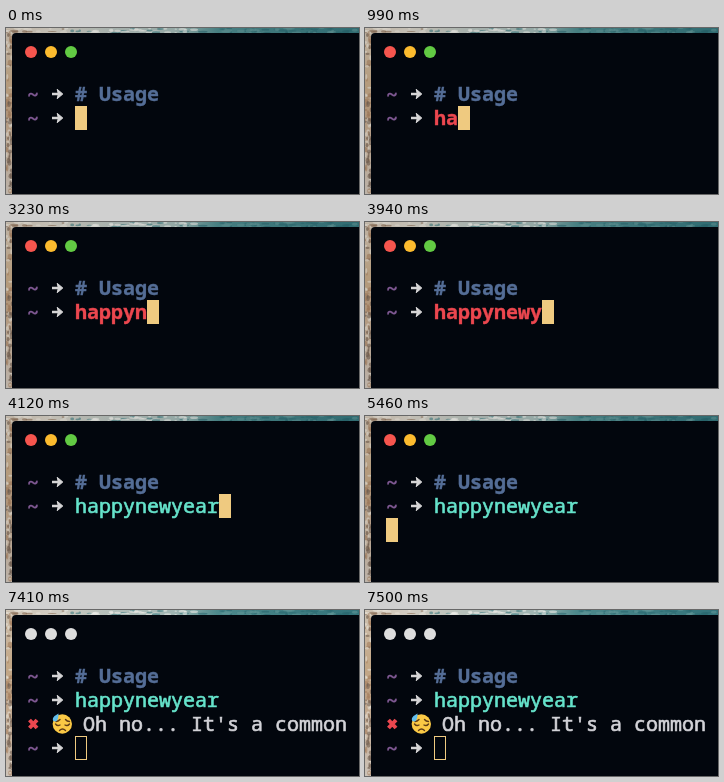
Write an HTML page that moves like this. It is 353x166 px and loops after 8.03 s.

```html
<!DOCTYPE html>
<html lang="en">
<head>
<meta charset="utf-8">
<title>Terminal usage</title>
<style>
  html, body { margin: 0; width: 100%; height: 100%; overflow: hidden; background: #02060d; }
  svg { display: block; width: 353px; height: 166px; }
  text { font: 20px "Noto Sans Mono", "DejaVu Sans Mono", monospace; }
  .bold { font-weight: 700; stroke-width: .35; }
  .medium { stroke-width: .65; }
</style>
</head>
<body>
<svg viewBox="0 0 353 166">
  <defs>
    <linearGradient id="sea">
      <stop offset="0" stop-color="#d3c6b5"/>
      <stop offset=".12" stop-color="#d9d3c8"/>
      <stop offset=".3" stop-color="#b9c4bf"/>
      <stop offset=".48" stop-color="#a5bbb8"/>
      <stop offset=".6" stop-color="#4f8d90"/>
      <stop offset="1" stop-color="#35777e"/>
    </linearGradient>
    <linearGradient id="sand" x2="0" y2="1">
      <stop offset="0" stop-color="#d3c6b5"/>
      <stop offset=".3" stop-color="#c9ad8b"/>
      <stop offset=".5" stop-color="#c4a688"/>
      <stop offset="1" stop-color="#d2c8bd"/>
    </linearGradient>
    <g id="prompt">
      <text class="bold" x="21" y="20" fill="#805a94" stroke="#805a94">~</text>
      <path d="M46 12H53" stroke="#d6d5d6" stroke-width="2.5"/>
      <path d="M51.2 7.3L56.8 12L51.2 16.7L52.3 12Z" fill="#d6d5d6" stroke="#d6d5d6" stroke-linejoin="round"/>
    </g>
  </defs>

  <rect width="353" height="166" fill="url(#sea)"/>
  <rect y="5" width="8" height="161" fill="url(#sand)"/>
  <g id="texture"></g>
  <rect id="shade" width="353" height="166"/>
  <path d="M6 166V9Q6 5 10 5H353V166Z" fill="#02060d"/>

  <g id="buttons">
    <circle cx="25" cy="24" r="6"/>
    <circle cx="45" cy="24" r="6"/>
    <circle cx="65" cy="24" r="6"/>
  </g>

  <use href="#prompt" y="54"/>
  <text class="bold" x="69" y="73" fill="#546d96" stroke="#546d96"># Usage</text>
  <use href="#prompt" y="78"/>
  <text id="command" x="69" y="97"></text>

  <g id="output">
    <path d="M23.5 110L31 118M31 110L23.5 118" stroke="#ec474f" stroke-width="4"/>
    <circle cx="56.3" cy="114" r="9.7" fill="#fbc945"/>
    <g fill="none" stroke="#5e3b17" stroke-width="1.4" stroke-linecap="round">
      <path d="M50 111.5Q52 111.5 54 109.5M59.5 109.5Q61 111.5 63.5 111.5"/>
      <path d="M49.5 114Q51.5 116.5 54 115M59 115Q61.5 116.5 63.5 114"/>
      <path d="M53.5 120.5Q56.5 117.5 59.5 120.5"/>
    </g>
    <path d="M52.5 103.5Q52.5 111 49.5 111.5Q46 111.5 47 108Q48.5 105.5 52.5 103.5Z" fill="#62bdec"/>
    <text class="medium" x="77" y="121" fill="#d3d3d8" stroke="#d3d3d8">Oh no... It's a common</text>
  </g>
  <use id="nextPrompt" href="#prompt" y="126"/>
  <rect id="cursor"/>
</svg>
<script>
  const LOOP = 8030, CELL = 12, LEFT = 21, INPUT = 69;
  const WORD = "happynewyear";
  // Time at which each letter of the command appears
  const KEYS = [900, 990, 1260, 1970, 2690, 3230, 3320, 3410, 3940, 4030, 4030, 4120];
  const ENTER = 5460, REPLY = 6000, READY = 6180, BLUR = 7410;
  const LIGHTS = ["#f6554e", "#fcbb2e", "#62ca43"];

  const $ = id => document.getElementById(id);
  const set = (el, attrs) => {
    for (const name in attrs) el.setAttribute(name, attrs[name]);
  };
  const show = (id, on) => set($(id), { visibility: on ? "visible" : "hidden" });

  let seed = 7;
  const random = () => (seed = seed * 16807 % 2147483647) / 2147483647;

  function speck(x, y, rx, ry, colors) {
    const el = document.createElementNS("http://www.w3.org/2000/svg", "ellipse");
    const fill = colors[Math.floor(random() * colors.length)];
    set(el, { cx: x, cy: y, rx, ry, fill, "fill-opacity": 0.6 });
    $("texture").append(el);
  }

  // Foam and water along the top, sand and rock down the left side
  function drawCoast() {
    for (let i = 0; i < 110; i++) {
      const x = random() * 353;
      const colors = x < 60 ? ["#efe9df", "#8c6e55"]
        : x < 195 ? ["#f3f3ee", "#f3f3ee", "#3e7f84"]
        : ["#2b6b73", "#639a9b"];
      speck(x, random() * 5, 1 + random() * 4, 0.5 + random(), colors);
    }
    for (let i = 0; i < 75; i++) {
      speck(random() * 6, 5 + random() * 161, 0.7 + random() * 1.6, 1 + random() * 2.5,
        ["#efe7dc", "#aa8261", "#756151"]);
    }
  }

  function cursorPlace(t, typed) {
    if (t < ENTER) return [INPUT + typed * CELL, 78];
    if (t < REPLY) return [LEFT, 102];
    return [t < READY ? LEFT : INPUT, 126];
  }

  function render(t) {
    const typed = KEYS.filter(key => t >= key).length;
    const valid = typed === WORD.length;
    const focused = t < BLUR;
    const color = valid ? "#66e3cb" : "#ec474f";

    $("command").textContent = WORD.slice(0, typed);
    set($("command"), { fill: color, stroke: color, class: valid ? "medium" : "bold" });
    show("output", t >= REPLY);
    show("nextPrompt", t >= READY);

    const [x, y] = cursorPlace(t, typed);
    const inset = focused ? 0 : 0.5;
    set($("cursor"), {
      x: x + inset, y: y + inset,
      width: CELL - 2 * inset, height: 24 - 2 * inset,
      fill: focused ? "#efca80" : "none",
      stroke: focused ? "none" : "#efca80"
    });

    [...$("buttons").children].forEach((dot, i) =>
      set(dot, { fill: focused ? LIGHTS[i] : "#dddddd" }));
    set($("shade"), { "fill-opacity": focused ? 0.1 : 0.03 });
  }

  drawCoast();
  const start = performance.now();
  function tick() {
    render((performance.now() - start) % LOOP);
    requestAnimationFrame(tick);
  }
  tick();
</script>
</body>
</html>
```
